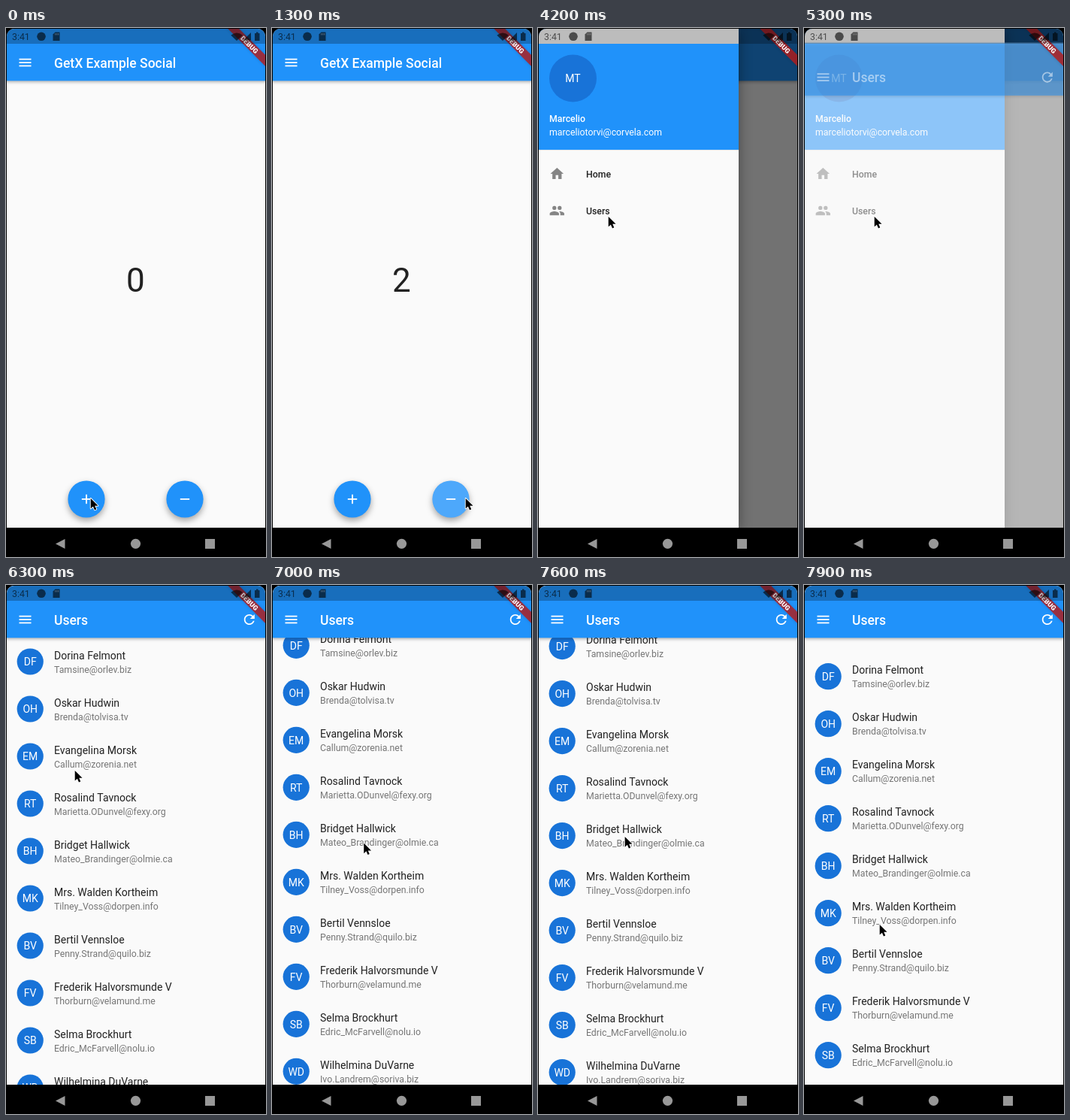
Recreate the animation shown at these times as an HTML page with a canvas. Size 346 px wide and 704 px high, loop 8000 ms.

```html
<!DOCTYPE html>
<html lang="en">
<head>
<meta charset="utf-8">
<title>Counter and users</title>
<style>
html, body { margin: 0; width: 100%; height: 100%; overflow: hidden; background: #000; }
canvas { display: block; }
</style>
</head>
<body>
<canvas id="stage" width="346" height="704"></canvas>
<script>
const ctx = document.getElementById('stage').getContext('2d');
const LOOP = 8000;
const DP = 0.878;
const BLUE = '#2092fa', DEEP = '#1873d8', PAPER = '#fafafa', INK = '#212121';

const users = [
  ['Dorina Felmont', 'Tamsine@orlev.biz'],
  ['Oskar Hudwin', 'Brenda@tolvisa.tv'],
  ['Evangelina Morsk', 'Callum@zorenia.net'],
  ['Rosalind Tavnock', 'Marietta.ODunvel@fexy.org'],
  ['Bridget Hallwick', 'Mateo_Brandinger@olmie.ca'],
  ['Mrs. Walden Kortheim', 'Tilney_Voss@dorpen.info'],
  ['Bertil Vennsloe', 'Penny.Strand@quilo.biz'],
  ['Frederik Halvorsmunde V', 'Thorburn@velamund.me'],
  ['Selma Brockhurt', 'Edric_McFarvell@nolu.io'],
  ['Wilhelmina DuVarne', 'Ivo.Landrem@soriva.biz']
];

const icons = {
  refresh: new Path2D('M17.65 6.35C16.2 4.9 14.21 4 12 4c-4.42 0-7.99 3.58-7.99 8s3.57 8 7.99 8c3.73 0 6.84-2.55 7.73-6h-2.08c-.82 2.33-3.04 4-5.65 4-3.31 0-6-2.69-6-6s2.69-6 6-6c1.66 0 3.14.69 4.22 1.78L13 11h7V4z'),
  home: new Path2D('M10 20v-6h4v6h5v-8h3L12 3 2 12h3v8z'),
  people: new Path2D('M16 11a3 3 0 1 0-3-3 3 3 0 0 0 3 3zM8 11a3 3 0 1 0-3-3 3 3 0 0 0 3 3zM8 13c-2.33 0-7 1.17-7 3.5V19h14v-2.5c0-2.33-4.67-3.5-7-3.5zM16 13l-1 .05c1.2.84 2 1.97 2 3.45V19h6v-2.5c0-2.33-4.67-3.5-7-3.5z'),
  arrow: new Path2D('M0 0V15.5L3.6 12.2 6 17.6 8.6 16.5 6.3 11.2H11.2Z')
};

// Clicks: [release time, button, counter afterwards]
const clicks = [
  [300, 'plus', 1], [700, 'plus', 2],
  [1350, 'minus', 1], [1600, 'minus', 0], [1850, 'minus', -1], [2100, 'minus', -2]
];

// Pointer and list offset keys: [time, values...]
const pointer = [
  [0, 112, 625], [850, 113, 626], [1150, 257, 625], [2250, 257, 625], [2850, 33, 50],
  [3500, 33, 50], [4100, 93, 250], [5600, 93, 250], [6100, 91, 246], [6300, 91, 246],
  [6750, 115, 440], [7300, 130, 216], [7900, 100, 451]
];
const offsets = [[6800, 0], [7300, 61], [7900, -19.7]];

const clamp = v => Math.min(1, Math.max(0, v));
const span = (t, from, to) => clamp((t - from) / (to - from));
const ease = v => v * v * (3 - 2 * v);
const easeOut = v => 1 - (1 - v) ** 3;

function sample(keys, t) {
  const next = keys.findIndex(k => k[0] > t);
  if (next === 0) return keys[0].slice(1);
  if (next < 0) return keys[keys.length - 1].slice(1);
  const a = keys[next - 1], b = keys[next];
  const p = ease(span(t, a[0], b[0]));
  return a.slice(1).map((v, i) => v + (b[i + 1] - v) * p);
}

function rect(x, y, w, h, fill) {
  ctx.fillStyle = fill;
  ctx.fillRect(x, y, w, h);
}

function disc(x, y, r, fill) {
  ctx.fillStyle = fill;
  ctx.beginPath();
  ctx.arc(x, y, r, 0, Math.PI * 2);
  ctx.fill();
}

function poly(points, fill) {
  ctx.fillStyle = fill;
  ctx.beginPath();
  points.forEach(p => ctx.lineTo(p[0], p[1]));
  ctx.fill();
}

// y is the middle of the capitals
function text(str, x, y, size, fill, weight = 400, align = 'left') {
  ctx.font = `${weight} ${size}px Roboto, sans-serif`;
  ctx.textAlign = align;
  ctx.fillStyle = fill;
  ctx.fillText(str, x, y + size * 0.355);
}

function icon(path, cx, cy, fill) {
  ctx.save();
  ctx.translate(cx - 12 * DP, cy - 12 * DP);
  ctx.scale(DP, DP);
  ctx.fillStyle = fill;
  ctx.fill(path);
  ctx.restore();
}

function withShadow(blur, dy, alpha, draw) {
  ctx.save();
  ctx.shadowColor = `rgba(0,0,0,${alpha})`;
  ctx.shadowBlur = blur;
  ctx.shadowOffsetY = dy;
  draw();
  ctx.restore();
}

function appBar(title) {
  withShadow(4, 1.5, 0.3, () => rect(0, 0, 346, 70.3, BLUE));
  for (const y of [41.6, 46, 50.4]) rect(17.5, y - 0.9, 16, 1.8, '#fff');
  text(title, 64, 46.3, 17.5, '#fff', 500);
}

function pressGlow(t, button) {
  return clicks.reduce((glow, [at, name]) => {
    if (name !== button) return glow;
    return Math.max(glow, span(t, at - 170, at - 70) * (1 - span(t, at, at + 170)));
  }, 0);
}

function fab(x, button, t) {
  const y = 627;
  withShadow(8, 4, 0.35, () => disc(x, y, 24.6, BLUE));
  disc(x, y, 24.6, `rgba(255,255,255,${0.2 * pressGlow(t, button)})`);
  rect(x - 6.2, y - 0.9, 12.4, 1.8, '#fff');
  if (button === 'plus') rect(x - 0.9, y - 6.2, 1.8, 12.4, '#fff');
}

function homePage(t) {
  rect(0, 0, 346, 665, PAPER);
  appBar('GetX Example Social');
  const glow = span(t, 3120, 3200) * (1 - span(t, 3250, 3450));
  disc(25, 46, 19, `rgba(255,255,255,${0.2 * glow})`);
  const count = clicks.reduce((n, c) => (t >= c[0] ? c[2] : n), 0);
  text(String(count), 172.3, 335, 44, INK, 400, 'center');
  fab(107, 'plus', t);
  fab(238, 'minus', t);
}

function drawer(t) {
  const open = easeOut(span(t, 3200, 3480));
  if (!open) return;
  rect(0, 0, 346, 665, `rgba(0,0,0,${0.54 * open})`);
  ctx.save();
  ctx.translate(-(1 - open) * 283, 0);
  withShadow(16, 4, 0.4, () => rect(0, 0, 267, 665, PAPER));
  rect(0, 21, 267, 141, BLUE);
  rect(0, 162, 267, 1, '#e0e4e8');
  disc(46.5, 67, 31.5, DEEP);
  text('MT', 46.5, 67, 14, '#fff', 400, 'center');
  text('Marcelio', 15, 121, 12.3, '#fff', 500);
  text('marceliotorvi@corvela.com', 15, 138.5, 12.3, '#fff');
  const tap = span(t, 4800, 4950) * (1 - span(t, 5050, 5250));
  rect(0, 219, 267, 49, `rgba(0,0,0,${0.1 * tap})`);
  icon(icons.home, 25.3, 194, '#858585');
  text('Home', 64, 194.5, 12.3, INK, 500);
  icon(icons.people, 25.3, 243, '#858585');
  text('Users', 64, 243.5, 12.3, INK, 500);
  ctx.restore();
}

function initials(name) {
  const words = name.split(' ');
  return words[0][0] + words[words.length - 1][0];
}

function usersPage(t) {
  const shown = span(t, 5150, 5450);
  if (!shown) return;
  ctx.save();
  ctx.globalAlpha = shown;
  ctx.translate(0, (1 - easeOut(shown)) * 160);
  rect(0, 0, 346, 665, PAPER);
  if (t >= 5600) {
    const [offset] = sample(offsets, t);
    users.forEach(([name, mail], i) => {
      const y = 102 + i * 63 - offset;
      disc(32.2, y, 17.6, DEEP);
      text(initials(name), 32.2, y + 0.2, 14, '#fff', 400, 'center');
      text(name, 64, y - 8.2, 14, INK);
      text(mail, 64, y + 10.2, 12.3, '#757575');
    });
  }
  appBar('Users');
  icon(icons.refresh, 323.8, 46, '#fff');
  ctx.restore();
}

function banner() {
  ctx.save();
  ctx.translate(345, 1);
  ctx.rotate(Math.PI / 4);
  withShadow(4, 0, 0.2, () => rect(-36, 24.6, 72, 10.5, 'rgba(183,28,28,0.8)'));
  text('DEBUG', 0, 29.9, 9, '#fff', 900, 'center');
  ctx.restore();
}

function statusBar() {
  rect(0, 0, 346, 21, 'rgba(0,0,0,0.25)');
  const tone = 'rgba(0,0,0,0.6)';
  text('3:41', 8, 11.3, 12.3, tone);
  disc(47, 11.3, 5.8, tone);
  poly([[65.5, 5.5], [71.5, 5.5], [71.5, 17], [62.5, 17], [62.5, 8.5]], tone);
  for (const x of [65.2, 67.2, 69.2]) rect(x, 7, 1, 2.5, 'rgba(255,255,255,0.3)');
  ctx.beginPath();
  ctx.moveTo(307, 17);
  ctx.arc(307, 17, 10.5, -Math.PI * 0.76, -Math.PI * 0.24);
  ctx.fillStyle = tone;
  ctx.fill();
  poly([[326, 6], [326, 16.5], [315.5, 16.5]], tone);
  rect(331, 7, 6.5, 10, tone);
  rect(333, 5.5, 2.5, 1.5, tone);
}

function navBar() {
  const tone = '#989898';
  poly([[66, 686.5], [78.5, 680], [78.5, 693]], tone);
  disc(172.5, 686.3, 6.6, tone);
  rect(265, 680, 13, 13, tone);
}

function cursor(t) {
  const [x, y] = sample(pointer, t);
  ctx.save();
  ctx.translate(x + 0.7, y + 0.9);
  ctx.scale(0.88, 0.88);
  ctx.lineJoin = 'round';
  ctx.lineWidth = 2;
  ctx.strokeStyle = '#fff';
  ctx.fillStyle = '#000';
  ctx.stroke(icons.arrow);
  ctx.fill(icons.arrow);
  ctx.restore();
}

function draw(t) {
  rect(0, 0, 346, 704, '#000');
  ctx.save();
  ctx.beginPath();
  ctx.roundRect(1, 1, 344, 664, [10, 10, 0, 0]);
  ctx.clip();
  homePage(t);
  drawer(t);
  usersPage(t);
  banner();
  statusBar();
  ctx.restore();
  navBar();
  cursor(t);
}

const start = performance.now();
function tick() {
  draw((performance.now() - start) % LOOP);
  requestAnimationFrame(tick);
}
tick();
</script>
</body>
</html>
```
